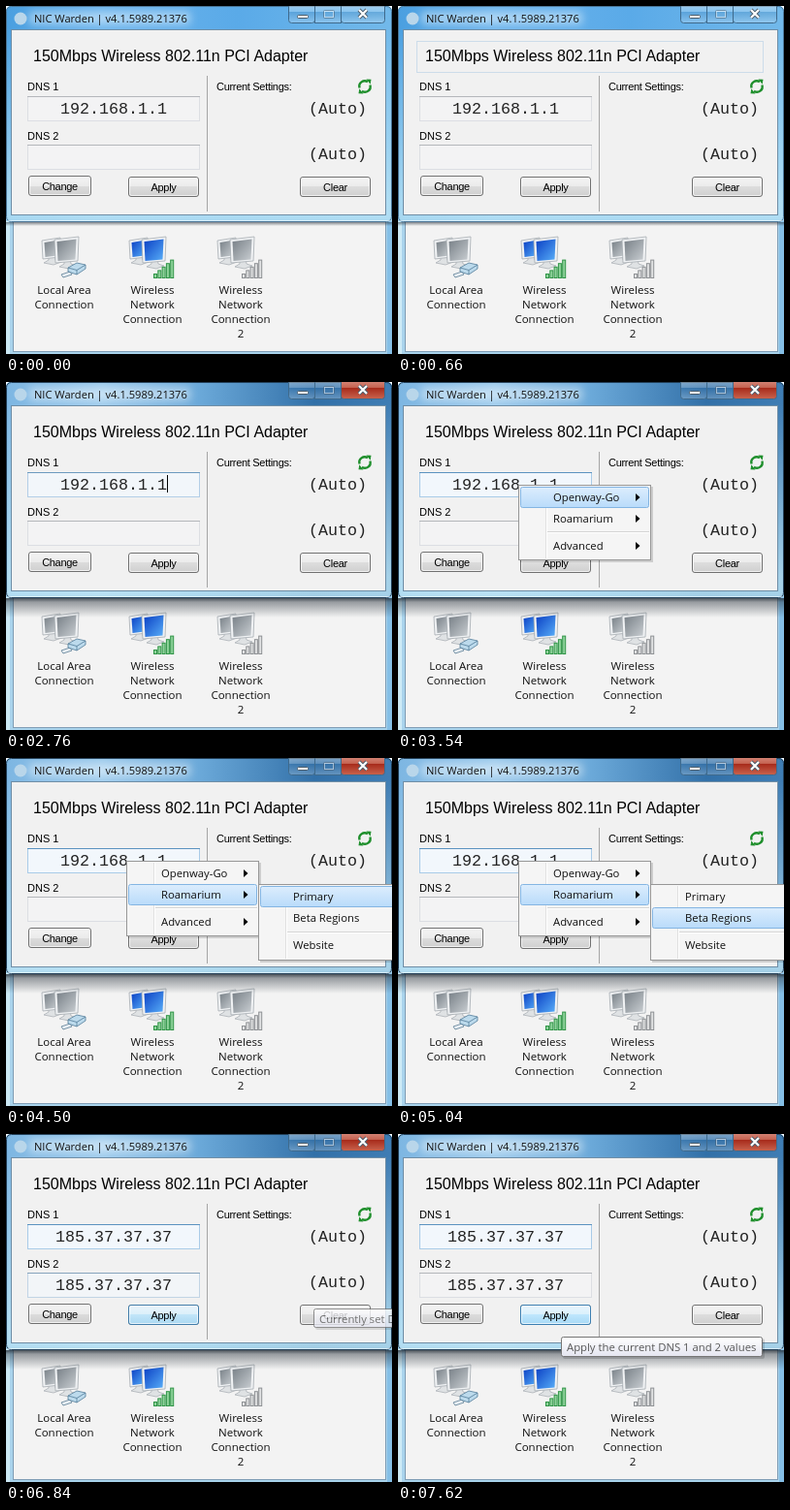
Write an HTML page that moves like this. It is 398 px wide and 359 px high and loops after 8000 ms.

```html
<!DOCTYPE html>
<html lang="en">
<head>
<meta charset="utf-8">
<title>DNS settings</title>
<style>
  html, body { margin: 0; width: 100%; height: 100%; overflow: hidden; background: #fff; }
  svg { display: block; width: 398px; height: 359px; }
  text { white-space: pre; }
  .ui { font: 11.3px "Open Sans", "Noto Sans", sans-serif; fill: #111; }
  .label { font: 11px "Liberation Sans", sans-serif; fill: #000; }
  .tight { letter-spacing: -.3px; }
  .head { font: 16px "Liberation Sans", sans-serif; fill: #000; }
  .mono { font: 16.667px "Liberation Mono", monospace; fill: #222; }
  .mid { text-anchor: middle; }
  .tip { fill: #575757; }
  .edge { shape-rendering: crispEdges; }
</style>
</head>
<body>
<svg id="stage" viewBox="0 0 398 359" xmlns="http://www.w3.org/2000/svg">
  <defs>
    <linearGradient id="idle" x2="1" y2="0">
      <stop offset="0" stop-color="#4a9fe0"/><stop offset=".25" stop-color="#6cb4ec"/>
      <stop offset=".6" stop-color="#5aaae8"/><stop offset="1" stop-color="#72b9ea"/>
    </linearGradient>
    <linearGradient id="active" x2="1" y2="0">
      <stop offset="0" stop-color="#7db6e2"/><stop offset=".25" stop-color="#9ccaec"/>
      <stop offset=".5" stop-color="#6ba9d9"/><stop offset=".8" stop-color="#3270a8"/>
      <stop offset="1" stop-color="#3f7db4"/>
    </linearGradient>
    <linearGradient id="sides" x2="0" y2="1">
      <stop offset=".1" stop-color="#bfe6f5" stop-opacity="0"/><stop offset=".9" stop-color="#bfe6f5" stop-opacity=".8"/>
    </linearGradient>
    <linearGradient id="glass" x2="0" y2="1">
      <stop offset="0" stop-color="#fff" stop-opacity=".45"/><stop offset=".5" stop-color="#fff" stop-opacity=".2"/>
      <stop offset=".5" stop-color="#3f74a4" stop-opacity=".2"/><stop offset="1" stop-color="#fff" stop-opacity=".25"/>
    </linearGradient>
    <linearGradient id="red" x2="0" y2="1">
      <stop offset="0" stop-color="#dc9a8e"/><stop offset=".48" stop-color="#c4604e"/>
      <stop offset=".5" stop-color="#a82c1c"/><stop offset="1" stop-color="#c9644e"/>
    </linearGradient>
    <linearGradient id="button" x2="0" y2="1">
      <stop offset="0" stop-color="#f4f4f4"/><stop offset=".5" stop-color="#ebebeb"/>
      <stop offset=".5" stop-color="#dddddd"/><stop offset="1" stop-color="#cfcfcf"/>
    </linearGradient>
    <linearGradient id="hot" x2="0" y2="1">
      <stop offset="0" stop-color="#eaf6fd"/><stop offset=".5" stop-color="#d9f0fc"/>
      <stop offset=".5" stop-color="#bee6fd"/><stop offset="1" stop-color="#a7d9f5"/>
    </linearGradient>
    <linearGradient id="tipFill" x2="0" y2="1">
      <stop offset="0" stop-color="#fff"/><stop offset="1" stop-color="#e4e5f0"/>
    </linearGradient>
    <linearGradient id="pick" x2="0" y2="1">
      <stop offset="0" stop-color="#dcedfd"/><stop offset="1" stop-color="#b9dbfa"/>
    </linearGradient>
    <linearGradient id="gray" x2="1" y2="1">
      <stop offset="0" stop-color="#777f86"/><stop offset="1" stop-color="#c9ced2"/>
    </linearGradient>
    <linearGradient id="blue" x2="1" y2="1">
      <stop offset="0" stop-color="#0a3fc4"/><stop offset="1" stop-color="#58aef8"/>
    </linearGradient>
    <linearGradient id="shade" x2="0" y2="1">
      <stop offset="0" stop-color="#222c36" stop-opacity=".55"/><stop offset="1" stop-color="#222c36" stop-opacity="0"/>
    </linearGradient>
    <filter id="blur" x="-10%" y="-60%" width="120%" height="220%"><feGaussianBlur stdDeviation="4"/></filter>
  </defs>
</svg>
<script>
const LOOP = 8000;
const svg = document.getElementById("stage");

const rect = (x, y, w, h, fill, more = "") =>
  `<rect x="${x}" y="${y}" width="${w}" height="${h}" fill="${fill}" ${more}/>`;
// One-pixel outline lying inside the given box
const frame = (x, y, w, h, fill, stroke, r = 0, more = "") =>
  rect(x + .5, y + .5, w - 1, h - 1, fill, `stroke="${stroke}" rx="${r}" ${more}`);
const text = (x, y, kind, s, more = "") => `<text x="${x}" y="${y}" class="${kind}" ${more}>${s}</text>`;
const path = (d, fill, more = "") => `<path d="${d}" fill="${fill}" ${more}/>`;
const group = (id, body) => `<g id="${id}">${body}</g>`;

const button = (x, y, w, h, s, fill = "button", stroke = "#707070") =>
  frame(x, y, w, h, `url(#${fill})`, stroke, 2.5) +
  frame(x + 1, y + 1, w - 2, h - 2, "none", "#fff", 2, 'stroke-opacity=".7"') +
  text(x + w / 2, y + 15, "label tight mid", s);

const field = y => frame(22, y, 178, 26, "#f3f3f4", "#dcdee3") + rect(22, y, 178, 1, "#b4b7bb");
const fieldGlow = (id, y) => group(id,
  frame(22, y, 178, 26, "#f2f7fc", "#a9cbe8") + rect(22, y, 178, 1, "#5b93c0"));

const tip = (id, x, y, w, h, s) => group(id,
  rect(x + 2, y + 2, w, h, "#000", 'rx="2" opacity=".15"') +
  frame(x, y, w, h, "url(#tipFill)", "#767676", 2) + text(x + 6, y + 14.5, "ui tip", s));

function monitors(x, y, screen) {
  const one = (dx, dy, w, h) =>
    path(`M${x + dx} ${y + dy + 2}l${w} -3l-1 ${h}l${2 - w} 2z`, "#f0f2f4", 'stroke="#a6adb2" stroke-width=".8"') +
    path(`M${x + dx + 2.5} ${y + dy + 4}l${w - 5} -2.5l-1 ${h - 4}l${7 - w} 1.5z`, `url(#${screen})`);
  const stand = (dx, dy) =>
    path(`M${x + dx} ${y + dy}l6 -1l1 5l6 2l-8 3l-10 -2l5 -3z`, "#dfe2e4", 'stroke="#a5abb0" stroke-width=".7"');
  return stand(8, 21) + one(1, 3, 19, 20) + stand(24, 25) + one(14, 2, 25, 25);
}

const bars = (x, fill, stroke) => [0, 1, 2, 3, 4].map(i =>
  frame(x + i * 4.3, 276 - i * 3.6, 4, 5 + i * 3.6, fill, stroke)).join("");

const caption = (cx, lines) => lines.map((s, i) =>
  text(cx, 297 + i * 15, "ui mid", s, 'style="font-size:11.5px"')).join("");

const explorer =
  rect(0, 215, 398, 144, "#a9d3ec") +
  rect(0, 222, 4, 137, "#cdeaf6") + rect(393, 222, 5, 137, "#85bfe6") +
  frame(7, 216, 385, 141, "#f3f3f3", "#7f9db5") +
  rect(0, 223, 398, 4, "url(#shade)") +
  monitors(36, 237, "gray") +
  path("M57 277l9 -3l2 3l-9 3z", "#e6edf2", 'stroke="#5c7d93" stroke-width=".8"') +
  path("M64 270l9 -5l9 2v4l-9 6l-9 -3z", "#bcdaec", 'stroke="#527c98" stroke-width=".8"') +
  path("M64 270l9 2.5l9 -5.5M73 272.5v4.5", "none", 'stroke="#527c98" stroke-width=".8"') +
  monitors(126, 237, "blue") + bars(152, "#8fd39b", "#2f9446") +
  monitors(217, 237, "gray") + bars(243, "#e0e1e2", "#8e9194") +
  caption(60, ["Local Area", "Connection"]) +
  caption(151, ["Wireless", "Network", "Connection"]) +
  caption(242, ["Wireless", "Network", "Connection", "2"]);

const chrome = (id, fill, line, closeFill) => group(id,
  rect(0, 0, 398, 223, `url(#${fill})`, 'rx="5"') +
  rect(0, 0, 398, 223, "url(#sides)", 'rx="5"') +
  frame(0, 0, 398, 223, "none", line, 5) +
  rect(2, 221, 394, 1, "#fff", 'opacity=".5"') +
  frame(291, -5, 28, 23, "url(#glass)", "#3f6a8c", 3) +
  frame(318, -5, 28, 23, "url(#glass)", "#3f6a8c") +
  frame(345, -5, 46, 23, `url(#${closeFill})`, "#3f6a8c", 3));

const signs =
  frame(300, 9, 12, 4, "#fff", "#4b5d6c", 1) +
  `<g opacity=".5">${frame(327, 4, 12, 9, "none", "#4b5d6c", 1) + frame(328, 5, 10, 7, "none", "#fff")}</g>` +
  path("M364 4l8 8m0 -8l-8 8", "none", 'stroke="#4b5d6c" stroke-width="4"') +
  path("M364 4l8 8m0 -8l-8 8", "none", 'stroke="#fff" stroke-width="2.2"');

const refresh =
  path("M364.6 84.5A5.5 5.5 0 0 1 373 78.3M375.4 81.5A5.5 5.5 0 0 1 367 87.7", "none",
    'stroke="#1f8f2c" stroke-width="2.4"') +
  path("M371.5 75.5l5 .3l-.8 5zM368.5 90.5l-5 -.3l.8 -5z", "#1f8f2c");

const client =
  frame(5, 24, 387, 192, "#f1f1f1", "#6f8ea6") +
  group("headGlow", frame(19, 36, 358, 33, "none", "#b5cfe7")) +
  text(28, 57, "head", "150Mbps Wireless 802.11n PCI Adapter") +
  rect(207, 72, 1, 140, "#a5a5a5") +
  text(22, 87, "label", "DNS 1") + text(22, 137.5, "label", "DNS 2") +
  text(217, 87, "label tight", "Current Settings:") + refresh +
  field(93) + fieldGlow("glow1", 93) + field(143) + fieldGlow("glow2", 143) +
  group("before", text(56, 111, "mono", "192.168.1.1")) +
  group("after", text(51, 111, "mono", "185.37.37.37") + text(51, 161, "mono", "185.37.37.37")) +
  '<rect id="caret" y="96" width="1" height="18" fill="#000" class="edge"/>' +
  text(312, 111, "mono", "(Auto)") + text(312, 158, "mono", "(Auto)") +
  button(23, 175, 65, 21, "Change") + button(126, 176, 73, 21, "Apply") +
  group("applyHot", button(126, 176, 73, 21, "Apply", "hot", "#3c7fb1")) +
  button(303, 176, 73, 21, "Clear");

const panel = (x, y, w, h) =>
  rect(x + 2, y + 2, w, h, "#000", 'opacity=".15"') + frame(x, y, w, h, "#f5f5f5", "#979797") +
  rect(x + 28, y + 2, 1, h - 4, "#e0e0e0") + rect(x + 29, y + 2, 1, h - 4, "#fff");
const arrow = y => path(`M245 ${y - 4}l4.5 4l-4.5 4z`, "#000");
const pick = (id, x, y, w) => group(id, frame(x, y, w, 22, "url(#pick)", "#84b5e2", 2));
const rule = (x, y, w) => rect(x, y, w, 1, "#d5d5d5") + rect(x, y + 1, w, 1, "#fff");

const menu = group("menu",
  panel(124, 106, 137, 78) + pick("pickA", 126, 108, 133) + pick("pickB", 126, 130, 133) +
  rule(154, 154, 105) +
  text(160, 122.5, "ui", "Openway-Go") + text(160, 145, "ui", "Roamarium") + text(160, 173, "ui", "Advanced") +
  arrow(119) + arrow(141) + arrow(169));
const submenu = group("submenu",
  panel(260, 130, 150, 79) + pick("pickC", 262, 132, 146) + pick("pickD", 262, 154, 146) +
  rule(290, 179, 110) +
  text(296, 147, "ui", "Primary") + text(296, 169, "ui", "Beta Regions") + text(296, 197, "ui", "Website"));

svg.insertAdjacentHTML("beforeend",
  explorer + chrome("idleChrome", "idle", "#4b7799", "glass") + chrome("activeChrome", "active", "#223f58", "red") +
  group("dropShade", rect(0, 223, 398, 20, "url(#shade)")) + signs +
  rect(24, 6, 166, 13, "#fff", 'filter="url(#blur)" opacity=".45"') +
  '<circle cx="15" cy="13" r="6.5" fill="#b9d6ea"/>' +
  text(29, 17, "ui", "NIC Warden | v4.1.5989.21376", 'style="font-size:11.1px"') +
  client + menu + submenu +
  tip("tipDns", 317, 180, 124, 20, "Currently set DNS 2") +
  tip("tipApply", 168, 209, 208, 21, "Apply the current DNS 1 and 2 values"));

// Opacity of each part: [time, value] pairs, held until the next
const cues = {
  headGlow: [[660, .6], [780, 0]],
  glow1: [[1020, .2], [1080, .4], [1140, .6], [2760, .8], [2820, 1]],
  activeChrome: [[2760, 1]],
  dropShade: [[2760, 1]],
  before: [[0, 1], [6120, 0]],
  after: [[6120, 1]],
  caret: [[2760, 1], [2820, 0], [6060, 1], [6600, 0], [7140, 1], [7620, 0]],
  menu: [[2820, .5], [2880, 1], [6120, 0]],
  pickA: [[3540, 1], [3780, 0]],
  pickB: [[3780, 1], [6060, 0]],
  submenu: [[4140, 1], [6120, 0]],
  pickC: [[4500, 1], [5040, 0]],
  pickD: [[5040, 1], [6060, 0]],
  tipDns: [[6600, .35], [6660, .7], [6720, 1], [6840, .8], [6900, .4], [6960, 0]],
  glow2: [[6780, .7], [6840, .5], [6900, .25], [6960, 0]],
  applyHot: [[6840, .9], [6900, 1]],
  tipApply: [[7200, .35], [7260, .7], [7320, 1]]
};
const parts = Object.entries(cues).map(([id, list]) => [document.getElementById(id), list]);
const caret = document.getElementById("caret");

const valueAt = (list, t) => list.reduce((v, [at, next]) => t >= at ? next : v, 0);

function update(t) {
  for (const [el, list] of parts) {
    const v = valueAt(list, t);
    el.setAttribute("opacity", v);
    el.setAttribute("visibility", v ? "visible" : "hidden");
  }
  caret.setAttribute("x", t < 6120 ? 166 : 51);
}

const start = performance.now();
function tick() {
  update((performance.now() - start) % LOOP);
  requestAnimationFrame(tick);
}
update(0);
requestAnimationFrame(tick);
</script>
</body>
</html>
```
